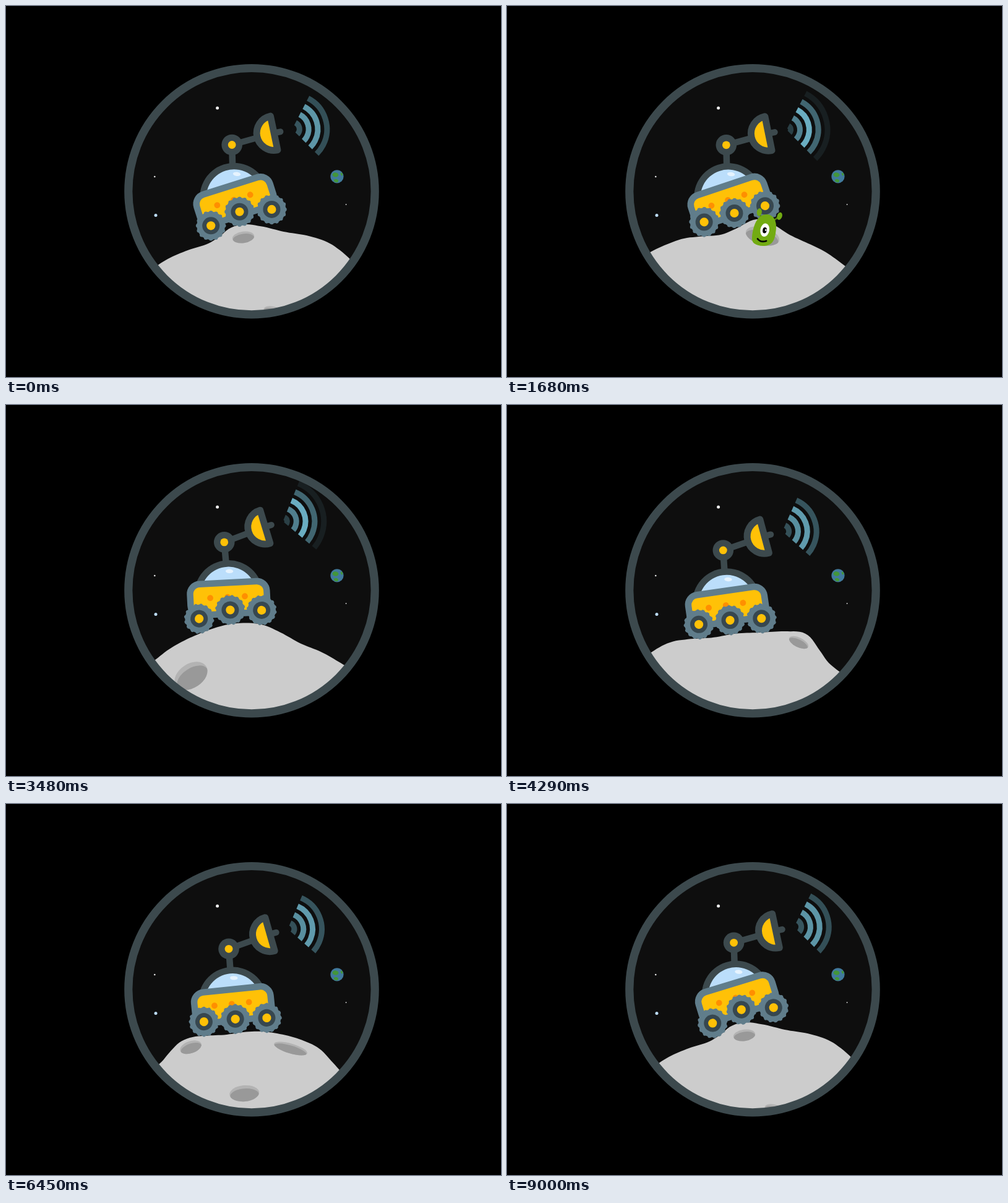
These frames come from a looping animation (800x600 px, 9.03 s). An HTML page with a canvas:

```html
<!DOCTYPE html>
<html lang="en">
<head>
<meta charset="utf-8">
<title>Moon rover</title>
<style>
  html, body { margin: 0; width: 100%; height: 100%; overflow: hidden; background: #000; }
  canvas { display: block; width: 800px; height: 600px; }
</style>
</head>
<body>
<canvas id="stage" width="800" height="600"></canvas>
<script>
const ctx = document.getElementById('stage').getContext('2d');
const LOOP = 9030, STEP = 30, SPIN = 0.04;
const MOON = { x: 388, y: 628 };
const PORT = { x: 397, y: 299.7, r: 199.2 };
const DARK = '#3c494d', SLATE = '#607d8b', YELLOW = '#ffc107', GREEN = '#72ab12';
const rad = d => d * Math.PI / 180;
const mod = (v, n) => ((v % n) + n) % n;

// Surface profile: angle in degrees, radius
const RIDGE = [
  4.6, 273, 13.3, 270, 21.7, 275.5, 28.2, 279, 33.1, 278, 39, 275, 45.1, 272,
  50.2, 266.7, 57.7, 261.6, 63.4, 268.6, 68.6, 281, 71.6, 284, 75.9, 278,
  81.7, 267.5, 87.6, 263.6, 96, 262.7, 104.7, 261, 110.7, 264, 122.3, 268.6,
  128, 272, 134.4, 275, 141.7, 275.3, 145.9, 272.9, 150.5, 267, 159, 258,
  168, 259, 176.4, 261, 185.7, 270, 190, 275, 193.3, 273, 198.2, 260,
  204, 248.5, 213, 247.5, 224.6, 251, 230, 259, 234.2, 265.3, 238.7, 265.7,
  245, 260.3, 250.6, 257, 257, 259, 262.2, 261, 268.4, 261.7, 276.8, 262.2,
  284.7, 261, 291.2, 253, 296.9, 248, 306, 248, 313.3, 248, 321.5, 251.5,
  327.7, 253, 339.5, 251, 345.5, 251, 350.4, 258.6, 354.5, 270, 359.4, 275
];

function knot(i) {
  const n = RIDGE.length / 2, j = mod(i, n);
  return [RIDGE[2 * j] + 360 * Math.floor(i / n), RIDGE[2 * j + 1]];
}

function spline(deg) {
  let i = -1;
  while (knot(i + 1)[0] <= deg) i++;
  const [a, b, c, d] = [i - 1, i, i + 1, i + 2].map(knot);
  const w = c[0] - b[0], u = (deg - b[0]) / w;
  const m0 = (c[1] - a[1]) / (c[0] - a[0]) * w;
  const m1 = (d[1] - b[1]) / (d[0] - b[0]) * w;
  const u2 = u * u, u3 = u2 * u;
  return (2 * u3 - 3 * u2 + 1) * b[1] + (u3 - 2 * u2 + u) * m0
       + (3 * u2 - 2 * u3) * c[1] + (u3 - u2) * m1;
}

const profile = Array.from({ length: 720 }, (_, i) => spline(i / 2));

function radius(deg) {
  const p = mod(deg, 360) * 2, i = Math.floor(p) % 720, f = p - Math.floor(p);
  return profile[i] * (1 - f) + profile[(i + 1) % 720] * f;
}

function groundY(x, turn) {
  const dx = x - MOON.x;
  let y = 370;
  for (let i = 0; i < 5; i++) {
    const r = radius(turn + Math.atan2(dx, MOON.y - y) * 180 / Math.PI);
    y = MOON.y - Math.sqrt(r * r - dx * dx);
  }
  return y;
}

// Height at which a wheel centre rests on the ground
function restY(x, turn) {
  let y = 1e3;
  for (let d = -20; d <= 20; d += 4) {
    y = Math.min(y, groundY(x + d, turn) - Math.sqrt(22.7 ** 2 - d * d));
  }
  return y;
}

// Rover key poses: time, x, y, tilt
const KEYS = [
  [0, 368, 313.7, -17.5], [1680, 357, 314, -18.5], [3480, 358, 310.7, -3],
  [4290, 353.7, 324, -8.2], [5490, 354.6, 335.5, -12.3],
  [7410, 375, 328.5, 7.2], [9000, 369.5, 313.5, -17]
];
const WHEELS = [-47.6, 3.3, 54], HANG = 26.8;
const wheelX = (x, lx, a) => x + lx * Math.cos(a) - HANG * Math.sin(a);

function rawPose(t, x) {
  let a = 0, ys;
  for (let i = 0; i < 3; i++) {
    const xs = WHEELS.map(lx => wheelX(x, lx, a));
    ys = xs.map(v => restY(v, t * SPIN));
    a = Math.atan2(ys[2] - ys[0], xs[2] - xs[0]);
  }
  const y = (ys[0] + ys[1] + ys[2]) / 3 - HANG * Math.cos(a) - 3.2 * Math.sin(a);
  return { y, tilt: a * 180 / Math.PI };
}

const tracks = KEYS.map(([t, x, y, tilt]) => {
  const raw = rawPose(t, x);
  return { t, x, y: y - raw.y, tilt: tilt - raw.tilt };
});

function pose(t) {
  let i = 0;
  while (i < tracks.length - 2 && tracks[i + 1].t <= t) i++;
  const a = tracks[i], b = tracks[i + 1], u = (t - a.t) / (b.t - a.t);
  const e = u * u * (3 - 2 * u), mix = k => a[k] + (b[k] - a[k]) * e;
  const x = mix('x'), raw = rawPose(t, x);
  return { x, y: raw.y + mix('y'), tilt: raw.tilt + mix('tilt') };
}

function ellipse(x, y, rx, ry, fill, tilt = 0) {
  ctx.beginPath();
  ctx.ellipse(x, y, rx, ry, rad(tilt), 0, 2 * Math.PI);
  ctx.fillStyle = fill;
  ctx.fill();
}
const disc = (x, y, r, fill) => ellipse(x, y, r, r, fill);

function line(x1, y1, x2, y2, width, color, cap = 'round') {
  ctx.beginPath();
  ctx.moveTo(x1, y1);
  ctx.lineTo(x2, y2);
  ctx.lineWidth = width;
  ctx.lineCap = cap;
  ctx.strokeStyle = color;
  ctx.stroke();
}

function scoped(draw) {
  ctx.save();
  draw();
  ctx.restore();
}

function turnMoon(deg) {
  ctx.translate(MOON.x, MOON.y);
  ctx.rotate(rad(deg));
  ctx.translate(-MOON.x, -MOON.y);
}

function drawSky() {
  disc(PORT.x, PORT.y, PORT.r, '#0e0e0e');
  disc(341.6, 165, 2.5, '#f2f2f2');
  disc(240.3, 276, 1.3, '#e8e8e8');
  disc(242, 338.5, 2.5, '#bcdcf8');
  disc(549.6, 321, 0.9, '#dddddd');
  disc(535, 275.8, 10.6, '#417a9c');
  ellipse(532.5, 273, 5, 3.6, '#43963a', 10);
  ellipse(533.5, 282.5, 3.6, 2.6, '#43963a', 20);
  ellipse(542.5, 272, 1.6, 2.6, '#43963a', -20);
}

// Craters: turn at which the placement holds, x, y, rx, ry, tilt
const CRATERS = [
  [0, 383.5, 374, 17.8, 9.3, -8], [67.2, 413, 372, 28, 14, 16],
  [139.2, 299, 438, 29, 19.5, -33], [171.6, 471.5, 384, 17, 7.8, 26],
  [219.6, 463.7, 388.5, 18, 9.8, 20], [296.4, 300, 401, 28, 8, -22],
  [19, 388, 488, 18, 9, 0], [257, 388, 468, 24, 13, -4]
];

function drawMoon(turn) {
  ctx.beginPath();
  for (let d = -60; d <= 60; d++) {
    const r = radius(turn + d);
    ctx.lineTo(MOON.x + r * Math.sin(rad(d)), MOON.y - r * Math.cos(rad(d)));
  }
  ctx.lineTo(MOON.x, MOON.y);
  ctx.fillStyle = '#cccccc';
  ctx.fill();
  for (const [at, x, y, rx, ry, tilt] of CRATERS) {
    scoped(() => {
      turnMoon(at - turn);
      ctx.translate(x, y);
      ctx.rotate(rad(tilt));
      ellipse(0, 0, rx, ry, '#b3b3b3');
      ctx.clip();
      ellipse(0, ry * 0.24, rx * 0.97, ry * 0.84, '#999999');
    });
  }
}

function drawSignal(t) {
  const phase = (t / 360) % 1;
  for (let k = 0; k < 5; k++) {
    const r = 1.5 + 14.8 * (k + phase), w = Math.min(9, r);
    const alpha = Math.min(r / 39, (74 - r) / 35, 1);
    if (alpha <= 0) continue;
    ctx.globalAlpha = alpha;
    ctx.beginPath();
    ctx.arc(30, 0, r - w / 2, rad(-51), rad(57));
    ctx.lineWidth = w;
    ctx.lineCap = 'butt';
    ctx.strokeStyle = '#70b7cc';
    ctx.stroke();
  }
  ctx.globalAlpha = 1;
}

function drawAntenna(p, t) {
  const a = rad(p.tilt), mast = rad(-5.5 - 0.22 * p.tilt), arm = -21.7 - 0.345 * p.tilt;
  const px = p.x + 2 * Math.cos(a) + 8 * Math.sin(a);
  const py = p.y + 2 * Math.sin(a) - 8 * Math.cos(a);
  const jx = px + 81 * Math.sin(mast), jy = py - 81 * Math.cos(mast);
  const dx = jx + 70.6 * Math.cos(rad(arm)), dy = jy + 70.6 * Math.sin(rad(arm));
  line(px, py, jx, jy, 10.5, DARK);
  line(jx, jy, dx - 15 * Math.cos(rad(arm)), dy - 15 * Math.sin(rad(arm)), 10, DARK);
  disc(jx, jy, 16.8, DARK);
  disc(jx, jy, 6.4, YELLOW);
  scoped(() => {
    ctx.translate(dx, dy);
    ctx.rotate(rad(arm + 3.8));
    drawSignal(t);
    line(0, 0, 10.5, 0, 10, DARK);
    ctx.beginPath();
    ctx.arc(0, 0, 28, Math.PI / 2, Math.PI * 1.5);
    ctx.closePath();
    ctx.fillStyle = YELLOW;
    ctx.fill();
    ctx.lineWidth = 11;
    ctx.lineJoin = 'round';
    ctx.strokeStyle = DARK;
    ctx.stroke();
  });
}

function drawWheel(x, y, spin) {
  scoped(() => {
    ctx.translate(x, y);
    ctx.rotate(spin);
    disc(0, 0, 22.8, SLATE);
    for (let i = 0; i < 16; i++) {
      const b = i * Math.PI / 8;
      disc(21 * Math.cos(b), 21 * Math.sin(b), 3.3, SLATE);
    }
    disc(0, 0, 14, '#37474f');
    disc(0, 0, 7.1, YELLOW);
  });
}

function drawRover(p, t) {
  const a = rad(p.tilt);
  drawAntenna(p, t);
  scoped(() => {
    ctx.translate(p.x, p.y);
    ctx.rotate(a);
    scoped(() => {
      ctx.beginPath();
      ctx.rect(-80, -80, 160, 85);
      ctx.clip();
      disc(2, -4, 55.5, DARK);
      disc(2, -4, 45, '#bbdefb');
      ctx.translate(2, -4);
      ctx.rotate(rad(1 - 1.31 * p.tilt));
      ellipse(0, -37.8, 6.2, 3.2, '#e6f3fe');
    });
    ctx.beginPath();
    ctx.roundRect(-60.2, -23.3, 124, 50.3, 16);
    ctx.fillStyle = YELLOW;
    ctx.fill();
    ctx.lineWidth = 10.5;
    ctx.strokeStyle = SLATE;
    ctx.stroke();
    for (const x of [-28, 0, 28]) disc(x, 0, 4.9, '#ff8f00');
    for (const lx of WHEELS) {
      const rest = restY(wheelX(p.x, lx, a), t * SPIN);
      const drop = (rest - p.y - lx * Math.sin(a)) / Math.cos(a);
      drawWheel(lx, Math.max(21, Math.min(33, drop)), rad(t * 0.429) - a);
    }
  });
}

const EGG = new Path2D('M421 337C434 339 437 352 434 368C432 380 428 388 414 388' +
  'C400 388 395 382 396 374C398 352 406 336 421 337Z');
const HOLE = new Path2D('M386 364A28 16.5 16 0 0 440 380L454 300H380Z');
const SMILE = new Path2D('M405 376.5Q410 383 419 380');

function drawAlien(t) {
  const ease = v => { const u = Math.max(0, Math.min(1, v)); return u * u * (3 - 2 * u); };
  const up = ease((t - 1200) / 330) * (1 - ease((t - 2150) / 330));
  if (up === 0) return;
  scoped(() => {
    turnMoon(67.2 - t * SPIN);
    ctx.clip(HOLE);
    ctx.translate(-10 * (1 - up), 63 * (1 - up));
    line(431, 347, 439, 341, 2.6, '#55800d');
    line(412, 344, 408.5, 337, 2.6, '#55800d');
    ellipse(440.6, 339.8, 4, 6.2, GREEN, 20);
    ellipse(407.8, 333.5, 4, 6.2, GREEN, 8);
    ctx.fillStyle = GREEN;
    ctx.fill(EGG);
    ellipse(416.7, 362.3, 7.3, 10.8, '#ffffff', 10);
    ellipse(416.5, 362.8, 3.3, 4.8, '#000000', 10);
    disc(418.2, 362.4, 1.3, '#ffffff');
    ctx.lineWidth = 2.8;
    ctx.lineCap = 'round';
    ctx.strokeStyle = '#000';
    ctx.stroke(SMILE);
  });
}

function render(t) {
  ctx.fillStyle = '#000';
  ctx.fillRect(0, 0, 800, 600);
  scoped(() => {
    ctx.beginPath();
    ctx.arc(PORT.x, PORT.y, PORT.r, 0, 2 * Math.PI);
    ctx.clip();
    drawSky();
    drawMoon(t * SPIN);
    drawRover(pose(t), t);
    drawAlien(t);
  });
  ctx.beginPath();
  ctx.arc(PORT.x, PORT.y, PORT.r, 0, 2 * Math.PI);
  ctx.lineWidth = 13.2;
  ctx.strokeStyle = DARK;
  ctx.stroke();
}

function tick() {
  render(Math.floor(performance.now() % LOOP / STEP) * STEP);
  requestAnimationFrame(tick);
}
tick();
</script>
</body>
</html>
```
